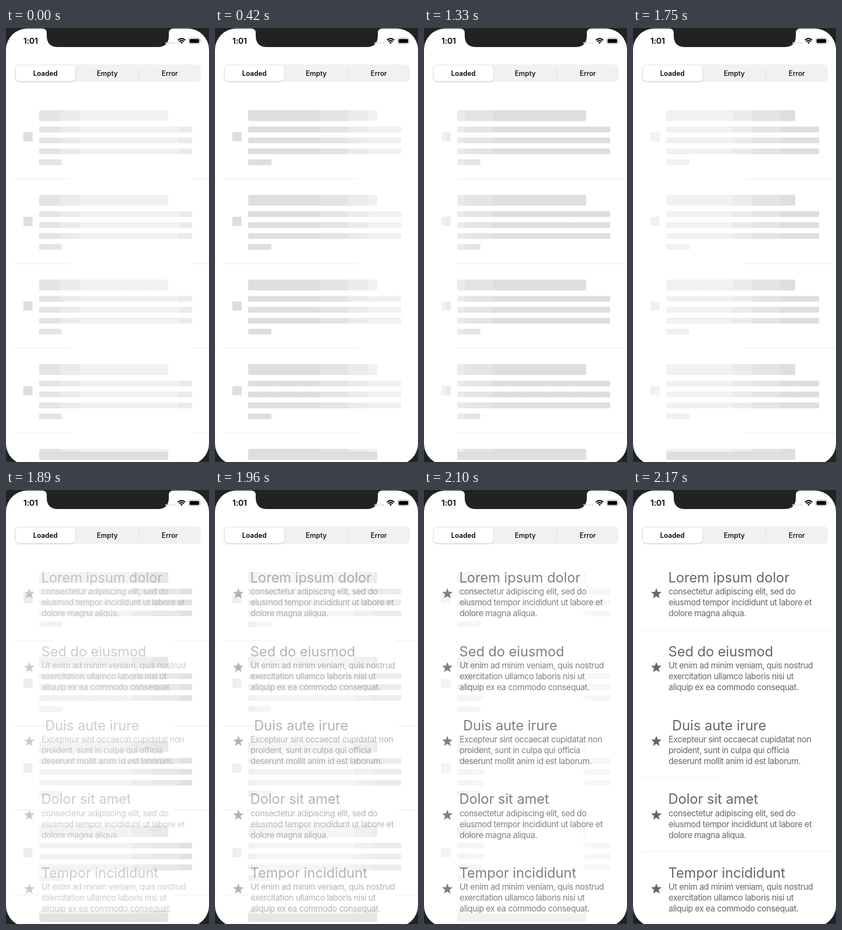
Animation of 374x798 px, one loop 2240 ms. Source, as an HTML page:

```html
<!DOCTYPE html>
<html lang="en">
<head>
<meta charset="utf-8">
<title>Skeleton loading list</title>
<style>
  html, body { margin: 0; width: 100%; height: 100%; overflow: hidden; background: #222; }
  svg { display: block; width: 100vw; height: 100vh; }
  text { font-family: Inter, Roboto, sans-serif; font-optical-sizing: none; white-space: pre; }
  .title { font-size: 25.3px; }
  .body { font-size: 15.35px; letter-spacing: -.42px; }
  .tab { font-size: 12.7px; font-weight: 500; text-anchor: middle; }
  .tab.on { font-size: 12.5px; font-weight: 600; }
  .clock { font-size: 15px; font-weight: 600; letter-spacing: -.2px; }
</style>
</head>
<body>
<svg viewBox="0 0 374 798">
  <defs>
    <linearGradient id="shimmer" gradientUnits="userSpaceOnUse" spreadMethod="repeat" x1="0" x2="738"/>
    <linearGradient id="rule" gradientUnits="userSpaceOnUse" spreadMethod="repeat" x1="0" x2="738"/>
    <filter id="shadow" x="-10%" y="-20%" width="120%" height="150%">
      <feDropShadow dx="0" dy="1.5" stdDeviation="1.8" flood-opacity=".16"/>
    </filter>
  </defs>
  <rect y="1" width="374" height="802" rx="39" fill="#fff"/>
  <path fill="#222" d="M66 0V1Q75 1 75 9V14Q75 35 96 35H279Q300 35 300 14V9Q300 1 309 1V0Z"/>

  <text class="clock" x="32" y="29">1:01</text>
  <g fill="#d4d4d4">
    <circle cx="295" cy="27.5" r="1.5"/><circle cx="300" cy="27.5" r="1.5"/>
    <circle cx="305" cy="27.5" r="1.5"/><circle cx="310" cy="27.5" r="1.5"/>
  </g>
  <g fill="none" stroke="#000" stroke-width="2.1">
    <path d="M316.8 22.4Q323.5 16.4 330.2 22.4M319.2 25Q323.5 21.2 327.8 25"/>
    <path d="M321.2 26.6Q323.5 25 325.8 26.6L323.5 29.2Z" fill="#000" stroke="none"/>
  </g>
  <rect x="336.5" y="18.5" width="21" height="10.5" rx="3" fill="none" stroke="#aaa"/>
  <rect x="338.2" y="20.2" width="17.6" height="7.2" rx="1.6"/>
  <path d="M359 22Q360.7 23.7 359 25.5Z" fill="#aaa"/>

  <rect x="16" y="67" width="343" height="32" rx="8" fill="#f1f1f1"/>
  <rect x="18" y="69" width="109.5" height="28.5" rx="6.5" fill="#fff" filter="url(#shadow)"/>
  <path d="M244.5 74V92" stroke="#dcdcdc"/>
  <text class="tab on" x="72.5" y="87.7">Loaded</text>
  <text class="tab" x="186.5" y="87.7">Empty</text>
  <text class="tab" x="301.8" y="87.7">Error</text>

  <g id="rules"></g>
  <g id="skeleton"></g>
  <g id="content" fill="#000"></g>
  <g id="finalRules" fill="#eee">
    <rect x="16" y="257.5" width="358" height="1"/>
    <rect x="16" y="528" width="144" height="1"/>
    <rect x="16" y="664" width="358" height="1"/>
  </g>
</svg>
<script>
const LOOP = 2240, STEP = 70, SPEED = 0.345, PERIOD = 738;
const FADE_START = 1890, FADE_END = 2170;
const $ = id => document.getElementById(id);

// Hard-edged bands: each [colour, from, to] in px of one period.
const fillBands = (id, bands) => {
  $(id).innerHTML = bands.map(([color, from, to]) =>
    [from, to].map(x => `<stop offset="${x / PERIOD}" stop-color="${color}"/>`).join('')).join('');
};
fillBands('shimmer', [
  ['#dedede', 0, 48], ['#e4e4e4', 48, 100], ['#ebebeb', 100, 136], ['#f1f1f1', 136, 318],
  ['#ebebeb', 318, 354], ['#e4e4e4', 354, 406], ['#dedede', 406, PERIOD]
]);
fillBands('rule', [['#ebebeb', 0, 117], ['#fff', 117, 341], ['#ebebeb', 341, PERIOD]]);

const bar = (x, y, w, h, r = 0, fill = 'url(#shimmer)') =>
  `<rect x="${x}" y="${y}" width="${w}" height="${h}" rx="${r}" fill="${fill}"/>`;

let bars = '', rules = '';
for (let row = 0; row < 5; row++) {
  const y = 151 + row * 155.7;
  bars += bar(61, y, 238, 20, 3.5);
  if (row === 4) break;
  for (let line = 0; line < 4; line++)
    bars += bar(61, y + 30.3 + line * 20.1, line < 3 ? 282 : 43, 10.6, 2);
  bars += bar(32, y + 40.3, 17, 17);
  rules += bar(16, Math.round(y + 126), 358, 1, 0, 'url(#rule)');
}
$('rules').innerHTML = rules;
$('skeleton').innerHTML = bars +
  '<rect id="gap" x="110" y="140" width="184" height="639" fill="#fff"/>' +
  '<path fill="#dedede" d="M61 779H299V790.5Q299 794 295.5 794H64.5Q61 794 61 790.5Z"/>';

const first = ['consectetur adipiscing elit, sed do', 'eiusmod tempor incididunt ut labore et', 'dolore magna aliqua.'];
const second = ['Ut enim ad minim veniam, quis nostrud', 'exercitation ullamco laboris nisi ut', 'aliquip ex ea commodo consequat.'];
const third = ['Excepteur sint occaecat cupidatat non', 'proident, sunt in culpa qui officia', 'deserunt mollit anim id est laborum.'];
const items = [
  ['Lorem ipsum dolor', first], ['Sed do eiusmod', second], [' Duis aute irure', third],
  ['Dolor sit amet', first], ['Tempor incididunt', second]
];
const star = Array.from({ length: 10 }, (_, i) => {
  const angle = i * Math.PI / 5, r = i % 2 ? 4.1 : 9.6;
  return `${43 + r * Math.sin(angle)},${-r * Math.cos(angle)}`;
}).join(' ');

$('content').innerHTML = items.map(([title, lines], row) => {
  const y = 170.2 + row * 135.75;
  return `<polygon points="${star}" transform="translate(0 ${y + 20.6})" stroke="#000" stroke-width=".6" stroke-linejoin="round"/>` +
    `<text class="title" x="65" y="${y}">${title}</text>` +
    lines.map((line, i) => `<text class="body" x="65.5" y="${y + 22.2 + i * 20}">${line}</text>`).join('');
}).join('');

const show = (id, opacity) => $(id).setAttribute('opacity', opacity);
const slide = (id, x) => $(id).setAttribute('gradientTransform', `translate(${x})`);

function draw(now) {
  const t = Math.floor(now % LOOP / STEP) * STEP;
  const fading = t >= FADE_START, done = t >= FADE_END, faded = t - FADE_START;
  slide('shimmer', SPEED * t);
  slide('rule', SPEED * t + (fading ? 55 : 0));
  show('rules', t < 2030 ? 1 : 0);
  show('skeleton', done ? 0 : fading ? 0.85 - faded * 0.3 / 140 : 1);
  show('gap', t >= 2030 ? 1 : 0);
  show('content', fading ? 0.2 + faded / 700 : 0);
  show('finalRules', done ? 1 : 0);
}

const start = performance.now();
function tick() {
  draw(performance.now() - start);
  requestAnimationFrame(tick);
}
tick();
</script>
</body>
</html>
```
